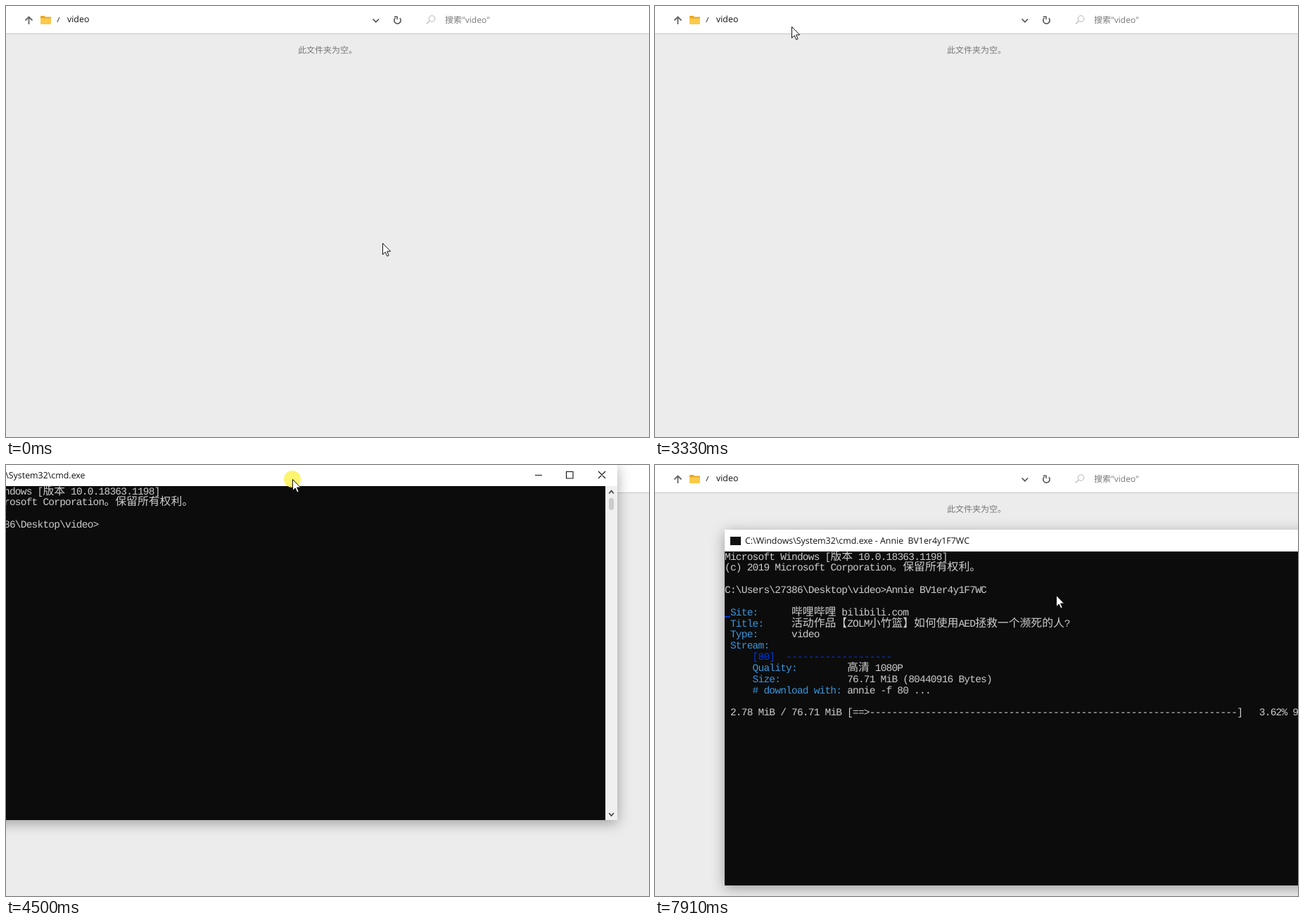
An HTML page that plays this animation: 914x613 px, repeating every 7.99 s.

```html
<!DOCTYPE html>
<html lang="zh-CN">
<head>
<meta charset="utf-8">
<title>video</title>
<style>
html, body { margin: 0; width: 100%; height: 100%; overflow: hidden; }
body { background: #ebeceb; }
#stage {
  position: relative; width: 914px; height: 613px; overflow: hidden; background: #ebeceb;
  font: 12.4px/20px "Open Sans", "Noto Sans CJK SC", "Noto Sans CJK", sans-serif;
  white-space: pre; text-rendering: geometricPrecision; color: #111;
}
#stage * { position: absolute; left: 0; top: 0; box-sizing: border-box; }
#stage span { position: static; }
#stage [hidden] { display: none; }
svg { overflow: visible; fill: none; }
#bar { width: 914px; height: 40px; background: #fff; border-bottom: 1px solid #c6c7c6; }
#stage #edit { left: 47px; top: 5px; width: 493px; height: 31px; border: 1px solid #0078d7; background: #fff; }
#stage #sel { left: 70px; top: 12px; width: 180px; height: 17px; background: #0a5ae0; }
#stage #typed { left: 71px; top: 10px; }
#stage #tick { top: 12px; width: 1px; height: 17px; background: #111; }
.grey { color: #777; }
.pop { background: #fff; border: 1px solid #bcbcbc; }
#stage #ime { left: 249px; top: 29px; height: 55px; }
#stage #keys { left: 9px; top: 3px; }
#stage #cands { left: 9px; top: 28px; font-size: 14px; word-spacing: 17px; }
#cands span { color: #0a5ae0; }
#stage #list { left: 70px; top: 36px; width: 441px; height: 51px; }
#win { width: 967px; height: 506px; background: #0c0c0c; box-shadow: 0 4px 18px rgba(0,0,0,.34); }
#cap { width: 967px; height: 31px; background: #fff; }
#stage #badge { left: 8px; top: 10px; width: 15px; height: 12px; background: #111; }
#stage #name { left: 29px; top: 6px; }
#stage #scroll { left: 950px; top: 31px; width: 17px; height: 475px; background: #f0f0f0; }
#stage #thumb { left: 5px; top: 17px; width: 7px; height: 17px; border-radius: 3px; background: #cbcbcb; }
.row {
  height: 15.84px; line-height: 15.84px; color: #ccc;
  font-family: "Liberation Mono", "Noto Sans CJK SC", "Noto Sans CJK", monospace;
  font-size: 14.5px; letter-spacing: calc(7.915px - .6001em);
}
.row span { font-size: 15.83px; letter-spacing: 0; line-height: 0; }
.cyan { color: #3a96dd; }
.blue { color: #0037da; }
#caret { width: 8px; height: 4px; background: #ccc; }
#stage #mark { top: 122.5px; width: 8px; height: 2.5px; background: #0037da; }
#mouse { width: 0; height: 0; }
#stage #glow { left: -12px; top: -12px; width: 24px; height: 24px; border-radius: 50%; background: #fdf35f; opacity: .9; }
</style>
</head>
<body>
<div id="stage">
  <div id="bar"></div>
  <div class="grey" style="left:415px;top:53px;font-size:12px">此文件夹为空。</div>
  <div class="grey" style="left:624px;top:10px;font-size:12px">搜索"video"</div>
  <div id="edit"></div>
  <svg width="914" height="40">
    <path d="M32.5 26V15.5M27.5 20.5L32.5 15.5L37.5 20.5" stroke="#666" stroke-width="1.8"/>
    <g id="folder">
      <path d="M49 15q0-1 1-1h4.5l1.5 1.5h7q1 0 1 1V25H49z" fill="#e9a825"/>
      <path d="M49 17.5h15V25q0 1-1 1H50q-1 0-1-1z" fill="#fcc94a"/>
    </g>
    <path id="chev" d="M521.5 18.5l4.3 4.3l4.3-4.3" stroke="#555" stroke-width="1.7"/>
    <path d="M559.8 17.2A4.7 4.7 0 1 1 553.5 16.8" stroke="#555" stroke-width="1.6"/>
    <path d="M552 15.2h4v4" stroke="#555" stroke-width="1.5"/>
    <circle cx="605.5" cy="18" r="4.3" stroke="#b4b4b4"/>
    <path d="M602.3 21.2L598 25.5" stroke="#b4b4b4" stroke-width="1.2"/>
  </svg>
  <div id="crumb">
    <svg width="90" height="40"><path d="M72.8 23L76 16" stroke="#555" stroke-width="1.2"/></svg>
    <div style="left:87px;top:9px">video</div>
  </div>
  <div id="sel"></div>
  <div id="typed"></div>
  <div id="tick"></div>
  <div id="ime" class="pop"><div id="keys"></div><div id="cands"></div></div>
  <div id="list" class="pop">
    <div style="left:4px;top:3px">cmd</div>
    <div style="left:4px;top:26px">搜索"cmd"</div>
  </div>
  <div id="win">
    <div id="cap">
      <div id="badge"></div>
      <div id="name"></div>
      <svg width="967" height="31" stroke="#111" stroke-width="1.1">
        <path d="M850 15.5h10M894.5 10.5h9.5v9.5h-9.5zM940 10l10 10M950 10l-10 10"/>
      </svg>
    </div>
    <div id="scroll">
      <div id="thumb"></div>
      <svg width="17" height="475" stroke="#444" stroke-width="1.7">
        <path d="M5.2 10.5L8.5 6.5L11.8 10.5M5.2 465L8.5 469L11.8 465"/>
      </svg>
    </div>
    <div id="log"></div>
    <div id="cmd"></div>
    <div id="out"><div id="mark"></div></div>
    <div id="caret"></div>
  </div>
  <div id="mouse">
    <div id="glow"></div>
    <svg width="13" height="20"><path d="M.5.5V16.5L4.2 13L6.8 18.8L9.2 17.7L6.6 12H11.6Z" fill="#fff" stroke="#111"/></svg>
  </div>
</div>
<script>
const LOOP = 7990, CELL = 7.915, LINE = 15.84;
const USER = 'C:\\Users\\27386\\Desktop\\video';
const EXE = 'C:\\Windows\\System32\\cmd.exe';
const JOB = 'BV1er4y1F7WC';
const $ = id => document.getElementById(id);
const show = (id, on) => { $(id).hidden = !on; };
const within = (t, a, b) => t >= a && t < b;
const mix = (a, b, p) => a + (b - a) * p;
const smooth = p => p * p * (3 - 2 * p);

// n equal jumps, the first at a and the last at b; returns jumps done
const jumps = (t, a, b, n) =>
  t < a ? 0 : Math.min(n, Math.floor((t - a) / ((b - a) / (n - 1)) + 0.03) + 1);

// CJK runs take two cells per character
const wide = s => s.replace(/[\u3000-\u9fff\uff00-\uffef]+/g, m => `<span>${m}</span>`);

function put(box, row, col, text, tone = '') {
  const d = document.createElement('div');
  d.className = 'row ' + tone;
  d.style.left = col * CELL + 'px';
  d.style.top = 32.6 + row * LINE + 'px';
  d.innerHTML = wide(text.replace(/>/g, '&gt;'));
  $(box).append(d);
  return d;
}

put('log', 0, 0, 'Microsoft Windows [版本 10.0.18363.1198]');
put('log', 1, 0, '(c) 2019 Microsoft Corporation。保留所有权利。');
put('log', 3, 0, USER + '>');
put('cmd', 3, 29, 'Annie ' + JOB);
[
  [5, 1, 'Site:', 12, '哔哩哔哩 bilibili.com'],
  [6, 1, 'Title:', 12, '活动作品【ZOLM小竹篮】如何使用AED拯救一个濒死的人?'],
  [7, 1, 'Type:', 12, 'video'],
  [8, 1, 'Stream:', 12, ''],
  [10, 5, 'Quality:', 22, '高清 1080P'],
  [11, 5, 'Size:', 22, '76.71 MiB (80440916 Bytes)'],
  [12, 5, '# download with:', 22, 'annie -f 80 ...']
].forEach(([row, c1, label, c2, value]) => {
  put('out', row, c1, label, 'cyan');
  put('out', row, c2, value);
});
put('out', 9, 5, '[80]  ' + '-'.repeat(19), 'blue');
const meter = put('out', 14, 1, '');

function progress(k) {
  if (k < 2) return '';
  const mib = 2.78 * (k - 2) / 3, part = mib / 76.71, n = Math.floor(part * 69);
  return `${mib.toFixed(2)} MiB / 76.71 MiB [${'='.repeat(n)}>${'-'.repeat(68 - n)}]` +
    `   ${(part * 100).toFixed(2)}% 9.27 MiB/s 7s`;
}

const IME = [
  ['c', 289, '从 才 次 出 错'],
  ['cm', 352, '草莓 沉默 出门 传媒 聪明'],
  ['cmd', 423, '出门的 聪明的 沉默的 草莓的 陈某的']
];

function address(t) {
  const edit = within(t, 1080, 3330);
  show('edit', edit);
  show('crumb', !edit);
  $('folder').setAttribute('transform', `translate(${edit ? 1 : 0})`);
  $('chev').setAttribute('transform', `translate(${edit ? -2 : 0})`);
  $('chev').setAttribute('stroke-width', edit ? 1.2 : 1.7);

  const picked = within(t, 1080, 2570);
  show('sel', picked);
  show('typed', edit);
  $('typed').textContent = within(t, 2570, 3180) ? 'cmd' : USER;
  $('typed').style.color = picked ? '#fff' : '#111';
  show('tick', within(t, 1240, 1780) || within(t, 2320, 3030));
  $('tick').style.left = (picked ? 249 : 95) + 'px';

  const k = jumps(t, 2020, 2320, 3);
  show('ime', k && t < 2570);
  if (k) {
    const [keys, width, words] = IME[k - 1];
    $('ime').style.width = width + 'px';
    $('keys').textContent = keys;
    $('cands').innerHTML = words.split(' ')
      .map((w, i) => i ? `${i + 1}.${w}` : `<span>1.${w}</span>`).join(' ');
  }
  show('list', within(t, 2800, 3030));
}

// window corner after each drag jump
const DRAG = [[-360, -218], [-322, -187], [-224, -106], [-98, -1], [0, 54], [68, 82], [99, 92]];

function terminal(t) {
  const open = jumps(t, 3330, 3640, 5) - 1;
  show('win', open > 0);
  const [x, y] = DRAG[jumps(t, 4350, 4730, 6)];
  const p = 1 - (1 - Math.max(0, open) / 4) ** 2;
  $('win').style.transform = `translate(${x}px,${y}px) scale(${mix(.9, 1, p)})`;
  $('win').style.opacity = p;

  $('name').textContent = EXE + (t >= 5970 ? ' - Annie  ' + JOB : '');
  show('cmd', t >= 5420);
  const first = within(t, 5113, 5420);
  show('caret', first || within(t, 6520, 7050));
  $('caret').style.left = (first ? 29 * CELL : 0) + 'px';
  $('caret').style.top = 31 + (first ? 4 : 5) * LINE - 4 + 'px';

  const k = jumps(t, 7600, 7910, 5);
  show('out', k > 0);
  meter.textContent = progress(k);
}

function pointer(t) {
  let x, y;
  if (t < 1000) {
    const p = smooth(jumps(t, 130, 920, 11) / 11);
    x = mix(535, 199, p); y = mix(337, 30, p);
  } else if (t < 4350) {
    x = 194; y = 29;
  } else if (t < 4960) {
    const [wx, wy] = DRAG[jumps(t, 4350, 4730, 6)];
    x = wx + 505; y = wy + 21;
  } else {
    const p = smooth(jumps(t, 4960, 5190, 4) / 4), q = jumps(t, 7300, 7450, 3) / 3;
    x = mix(604, 577, p) - 7 * q; y = mix(113, 181, p) + 4 * q;
  }
  $('mouse').style.transform = `translate(${Math.round(x)}px,${Math.round(y)}px)`;
  show('glow', within(t, 1080, 1240) || within(t, 4350, 4960));
}

const start = performance.now();
function frame() {
  const t = (performance.now() - start) % LOOP;
  address(t);
  terminal(t);
  pointer(t);
  requestAnimationFrame(frame);
}
frame();
</script>
</body>
</html>
```
